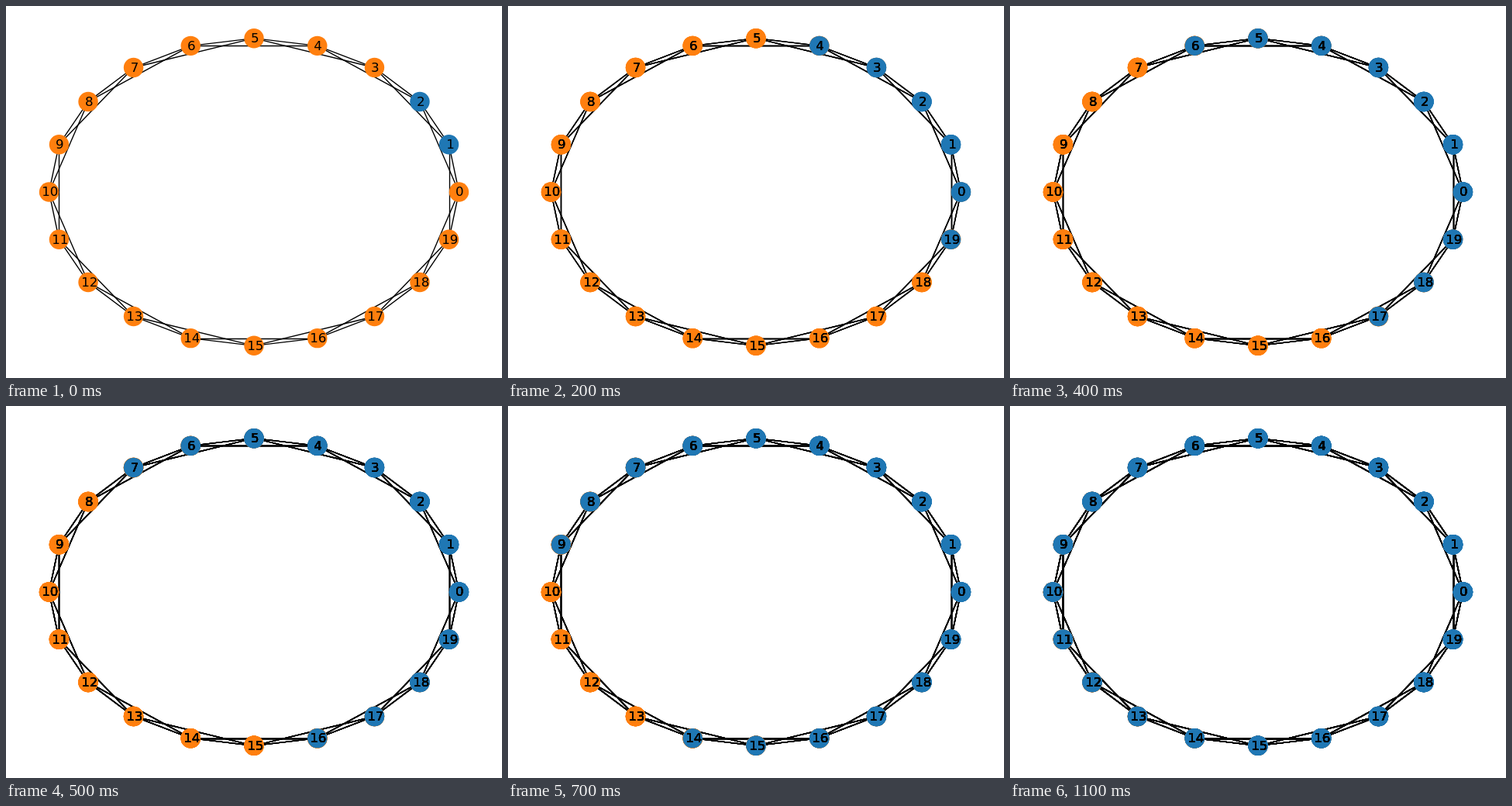
Write an HTML page with a canvas that moves like this. It is 640 px wide and 480 px high and loops after 1.2 s.

```html
<!DOCTYPE html>
<html lang="en">
<head>
<meta charset="utf-8">
<title>Spread on a ring graph</title>
<style>
  html, body { margin: 0; width: 100%; height: 100%; overflow: hidden; background: #fff; }
  canvas { display: block; }
</style>
</head>
<body>
<canvas id="stage" width="640" height="480"></canvas>
<script>
const W = 640, H = 480, N = 20;
const STEP = 100, STEPS = 12;
const PT = 100 / 72;
const FONT_SIZE = 12 * PT;
const FAMILY = '"DejaVu Sans", sans-serif';
const RADIUS = (Math.sqrt(300) + 1) * PT / 2;
const BLUE = '#1f77b4', ORANGE = '#ff7f0e';
const ctx = document.getElementById('stage').getContext('2d');

const nodes = Array.from({ length: N }, (_, i) => {
  const a = 2 * Math.PI * i / N;
  return {
    x: W / 2 * (1 + Math.cos(a) / 1.21),
    y: H / 2 * (1 - Math.sin(a) / 1.21)
  };
});

// Measure large, then scale down, for exact ink bounds.
ctx.font = `1000px ${FAMILY}`;
const labels = nodes.map((p, i) => {
  const m = ctx.measureText(i);
  const k = FONT_SIZE / 1000;
  const left = -m.actualBoundingBoxLeft * k;
  const ink = m.actualBoundingBoxRight * k - left;
  return {
    text: String(i),
    x: Math.round(p.x - ink / 2 + left) - left,
    y: Math.round(p.y + 4.4) + 1
  };
});

const snap = v => Math.floor(v + 0.5) + 0.5;
const same = (a, b) => Math.abs(a - b) < 1e-4;

function drawEdge(a, b) {
  let { x: x1, y: y1 } = a, { x: x2, y: y2 } = b;
  if (same(x1, x2)) x1 = x2 = snap(x1);
  if (same(y1, y2)) y1 = y2 = snap(y1);
  ctx.beginPath();
  ctx.moveTo(x1, y1);
  ctx.lineTo(x2, y2);
  ctx.stroke();
}

function drawEdges() {
  nodes.forEach((p, i) => {
    drawEdge(p, nodes[(i + 1) % N]);
    drawEdge(p, nodes[(i + 2) % N]);
  });
}

// The blue arc starts at nodes 1 and 2 and grows by one on each side.
function isBlue(i, step) {
  return (i - 1 + step + N) % N < 2 + 2 * step;
}

function drawNodes(step) {
  nodes.forEach((p, i) => {
    ctx.fillStyle = isBlue(i, step) ? BLUE : ORANGE;
    ctx.beginPath();
    ctx.arc(p.x, p.y, RADIUS, 0, 2 * Math.PI);
    ctx.fill();
  });
}

function drawLabels() {
  ctx.fillStyle = '#000';
  labels.forEach(l => ctx.fillText(l.text, l.x, l.y));
}

// Every step adds one more layer, which thickens the soft edges.
function render(step) {
  ctx.fillStyle = '#fff';
  ctx.fillRect(0, 0, W, H);
  ctx.strokeStyle = '#000';
  ctx.lineWidth = PT;
  ctx.font = `${FONT_SIZE}px ${FAMILY}`;
  for (let s = 0; s <= step; s++) drawEdges();
  for (let s = 0; s <= step; s++) drawNodes(s);
  for (let s = 0; s <= step; s++) drawLabels();
}

const start = performance.now();
let shown = -1;

function tick() {
  const step = Math.floor((performance.now() - start) / STEP) % STEPS;
  if (step !== shown) render(shown = step);
  requestAnimationFrame(tick);
}
tick();
</script>
</body>
</html>
```
